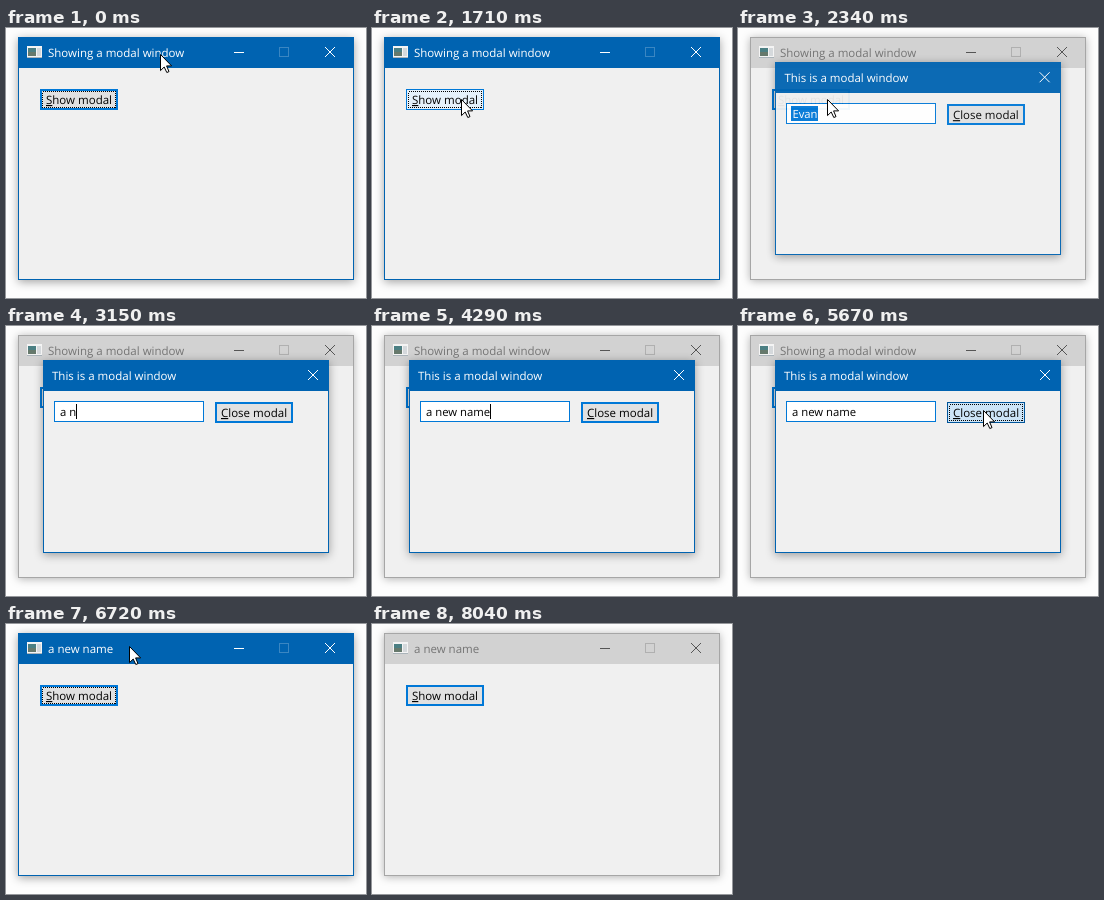
Animation, 360 px wide and 270 px high, one loop 8.14 s. Source, as an HTML page:

```html
<!DOCTYPE html>
<html lang="en">
<head>
<meta charset="utf-8">
<title>Modal window demo</title>
<style>
  html, body { margin: 0; width: 100%; height: 100%; overflow: hidden; background: #fdfdfd; }
  svg { display: block; width: 360px; height: 270px; }
  text { font: 11.5px "Open Sans", "Noto Sans", sans-serif; white-space: pre; text-rendering: geometricPrecision; }
  rect, line { shape-rendering: crispEdges; }
  .frame { fill: #0063b1; filter: drop-shadow(0 2px 5px rgba(0, 0, 0, .36)); }
  .bar { fill: #0063b1; }
  .client { fill: #f0f0f0; }
  .caption { fill: #fff; }
  .icons { fill: none; stroke: #fff; }
  .icons .dim { stroke: #3a86c2; }
  .inactive .frame { fill: #a6a6a6; filter: drop-shadow(0 1px 4px rgba(0, 0, 0, .3)); }
  .inactive .bar { fill: #d2d2d2; }
  .inactive .caption { fill: #757575; }
  .inactive .icons { stroke: #555; }
  .inactive .icons .dim { stroke: #b0b0b0; }

  .edge { fill: #0078d7; width: 78px; height: 21px; }
  .face { fill: #e1e1e1; x: 2px; y: 2px; width: 74px; height: 17px; }
  .hover .face, .press .face { fill: #e5f1fb; x: 1px; y: 1px; width: 76px; height: 19px; }
  .press .face { fill: #cce4f7; }
  .press .edge { fill: #005499; }
  .dots { fill: none; stroke: #000; stroke-dasharray: 1; visibility: hidden; }
  .focus .dots { visibility: visible; }
  .key { text-decoration: underline; }
  #field { font-size: 11.3px; }
</style>
</head>
<body>
<svg viewBox="0 0 360 270">
  <g id="main">
    <rect class="frame" x="12" y="9" width="336" height="243"/>
    <rect class="bar" x="13" y="10" width="334" height="30"/>
    <rect class="client" x="13" y="40" width="334" height="211"/>
    <g>
      <rect x="21" y="18" width="15" height="12" fill="#f4f4f4"/>
      <rect x="22" y="20" width="8" height="8" fill="#4b7f83"/>
      <rect x="22" y="24" width="8" height="4" fill="#66796c"/>
      <rect x="31" y="20" width="4" height="8" fill="#d5d9dc"/>
      <rect x="21" y="29" width="15" height="1" fill="#aab4ba"/>
    </g>
    <text id="title" class="caption" x="42" y="29"></text>
    <g class="icons">
      <line x1="228" x2="238" y1="24.5" y2="24.5"/>
      <rect class="dim" x="273.5" y="19.5" width="9" height="9"/>
      <path d="M319 19l10 10m0-10l-10 10"/>
    </g>
    <g id="show" transform="translate(34 61)">
      <rect class="edge"/><rect class="face"/>
      <rect class="dots" x="2.5" y="2.5" width="73" height="16"/>
      <text x="6" y="15"><tspan class="key">S</tspan>how modal</text>
    </g>
  </g>

  <g id="modal">
    <rect class="frame" x="37" y="34" width="286" height="193"/>
    <rect class="client" x="38" y="65" width="284" height="161"/>
    <text class="caption" x="46" y="54">This is a modal window</text>
    <path class="icons" d="M302 44l10 10m0-10l-10 10"/>
    <rect x="48.5" y="75.5" width="149" height="20" fill="#fff" stroke="#0078d7"/>
    <rect id="selection" x="53" y="78" width="27" height="15" fill="#0078d7"/>
    <text id="field" x="54" y="90"></text>
    <rect id="caret" y="78" width="1" height="15"/>
    <g id="close" transform="translate(209 76)">
      <rect class="edge"/><rect class="face"/>
      <rect class="dots" x="2.5" y="2.5" width="73" height="16"/>
      <text x="6" y="15"><tspan class="key">C</tspan>lose modal</text>
    </g>
  </g>

  <path id="cursor" d="M.5 .5V16.6L4.2 13L6.8 18.5L9 17.6L6.6 11.9H11.6Z" fill="#fff" stroke="#000"/>
</svg>
<script>
const LOOP = 8140;
const $ = id => document.getElementById(id);
const [main, modal, title, show, closeBtn, field, selection, caret, cursor] =
  ['main', 'modal', 'title', 'show', 'close', 'field', 'selection', 'caret', 'cursor'].map($);

// Spreads values evenly over a time span
const spread = (from, to, values) =>
  values.map((v, i) => [from + (to - from) * i / (values.length - 1), v]);

// Last value whose time has come
const at = (track, t) => track.findLast(([time]) => time <= Math.ceil(t))[1];

const pointer = [
  [0, [154, 26]], [130, [154, 27]],
  ...spread(780, 1710, [[158, 30], [160, 42], [152, 58], [138, 73], [122, 82], [108, 85], [96, 78], [89, 71]]),
  [3000, null],
  ...spread(4580, 5540, [[97, 55], [112, 53], [134, 54], [160, 58], [188, 63], [212, 69], [232, 76], [243, 81]]),
  [5670, [245, 84]],
  ...spread(6200, 6600, [[226, 70], [184, 44], [146, 27], [124, 22]]),
  [6720, [123, 22]],
  ...spread(7030, 7720, [[140, 40], [190, 90], [250, 150], [300, 205], [326, 250], null]),
];
const typed = [
  [0, 'Evan'],
  ...spread(3000, 3890, ['a', 'a n', 'a ne', 'a new', 'a new n', 'a new na', 'a new name']),
];
const showState = [[0, 'focus'], [1575, 'focus hover'], [1840, 'focus press'], [1970, 'focus hover'], [2210, ''], [5930, 'focus'], [8040, '']];
const closeState = [[0, ''], [5400, 'hover'], [5670, 'focus press'], [5800, 'focus hover']];
const active = [[0, true], [2210, false], [5930, true], [8040, false]];
const caption = [[0, 'Showing a modal window'], [5930, 'a new name']];
const caretOn = [[0, false], [3000, true], [4170, false], [4290, true], [5670, false]];
// Opacity and scale of the modal window
const fade = [[0, [0, 1]], [2210, [.55, .965]], [2340, [.95, .997]], [2470, [1, 1]], [5930, [.35, .96]], [6070, [0, 1]]];

const setClass = (el, name) => el.setAttribute('class', name);
const setShown = (el, on) => el.setAttribute('visibility', on ? 'inherit' : 'hidden');

function draw(t) {
  setClass(main, at(active, t) ? '' : 'inactive');
  title.textContent = at(caption, t);
  setClass(show, at(showState, t));
  setClass(closeBtn, at(closeState, t));

  const [opacity, scale] = at(fade, t);
  modal.setAttribute('opacity', opacity);
  modal.setAttribute('transform', `translate(180 130.5) scale(${scale}) translate(-180 -130.5)`);

  const selected = t < 3000;
  field.textContent = at(typed, t);
  field.setAttribute('fill', selected ? '#fff' : '#000');
  setShown(selection, selected);
  setShown(caret, at(caretOn, t));
  caret.setAttribute('x', Math.round(54 + field.getComputedTextLength()));

  const spot = at(pointer, t);
  setShown(cursor, spot);
  if (spot) cursor.setAttribute('transform', `translate(${spot})`);
}

let start;
function tick(now) {
  start ??= now;
  draw((now - start) % LOOP);
  requestAnimationFrame(tick);
}
draw(0);
requestAnimationFrame(tick);
</script>
</body>
</html>
```
